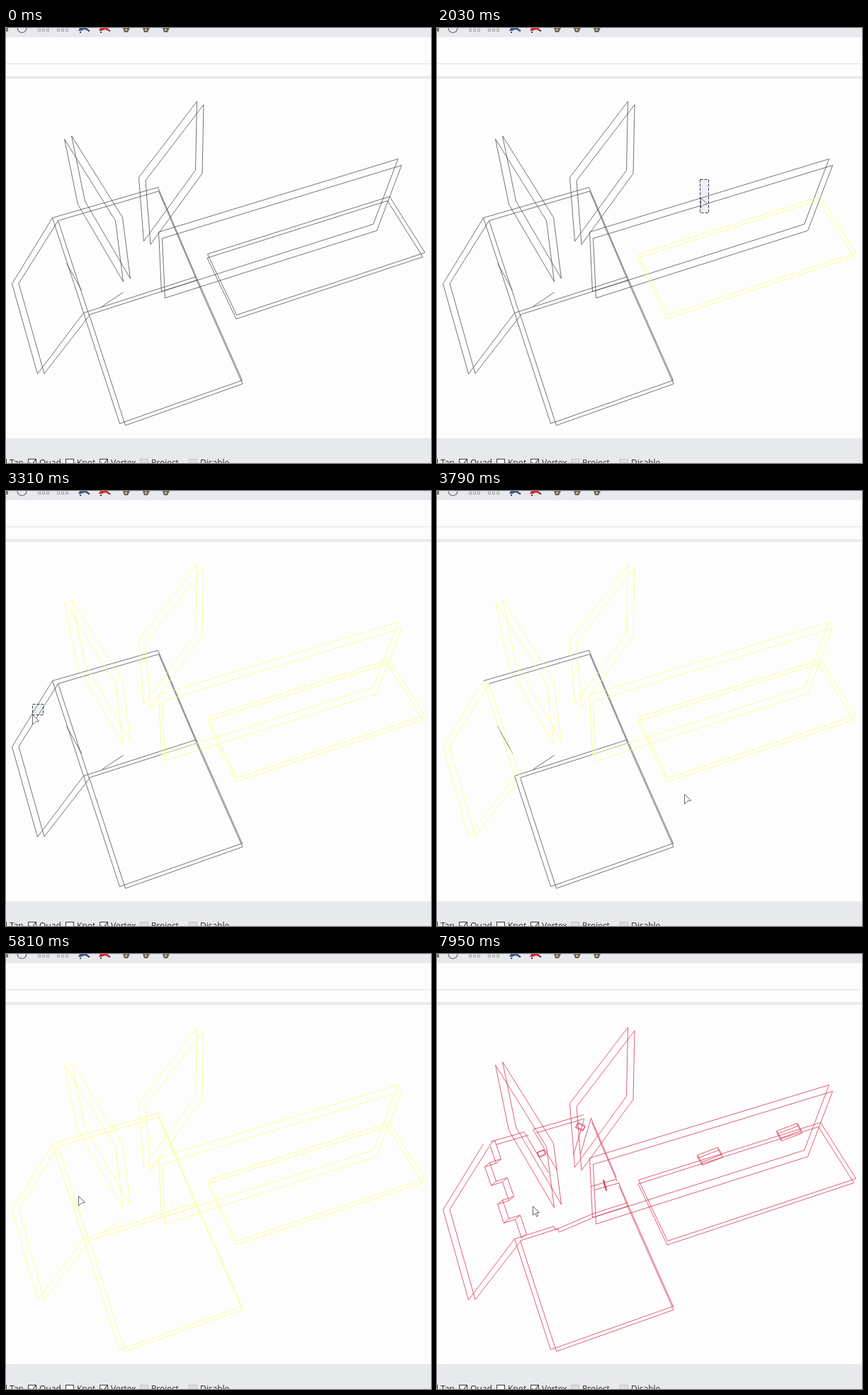
An HTML page with a canvas that plays this animation: 600 px wide and 613 px high, repeating every 8 s.

```html
<!DOCTYPE html>
<html lang="en">
<head>
<meta charset="utf-8">
<title>Selecting panels</title>
<style>
html, body { margin: 0; width: 100%; height: 100%; overflow: hidden; background: #fefdfe; }
canvas { display: block; width: 600px; height: 613px; }
</style>
</head>
<body>
<canvas id="stage" width="600" height="613"></canvas>
<script>
const ctx = document.getElementById('stage').getContext('2d');
const LOOP = 8000, STEP = 160 / 3, DRAG = 110;
const DARK = '#444348', YELLOW = '#f7ff86', RED = '#d02b48';

const mix = (a, b, k) => a + (b - a) * k;
const between = (p, q, k) => [mix(p[0], q[0], k), mix(p[1], q[1], k)];
const add = (p, d) => [p[0] + d[0], p[1] + d[1]];

// A board has a front face and a back face; the first and last corners
// shift by `outer`, the two in between by `inner`.
function board(front, outer, inner = outer) {
  const back = front.map((p, i) => add(p, i % 3 ? inner : outer));
  return [front, back];
}

const lower = board([[541, 237], [284, 318], [325, 404], [591, 316]], [-3, 6], [-0.5, 5.5]);
const long = board([[553, 184], [215, 287], [219, 371], [518, 276]], [5, 9]);
const fin = board([[269, 103], [187, 210], [194, 300], [267, 200]], [9.5, 4.5]);
const blade = board([[82, 156], [101, 248], [165, 357], [154, 271]], [10, -4.5]);
const side = board([[65, 267], [8, 360], [44, 487], [109, 401]], [8, 4], [9.5, -0.5]);
const base = board([[109, 401], [268, 350], [333, 496], [160, 557]], [8, 2.5], [0.5, 5]);
const middle = board([side[0][0], [214, 224], base[0][1], base[0][0]], [8, 4], [1, 5.5]);

function trace(path, points) {
  points.forEach((p, i) => i ? path.lineTo(...p) : path.moveTo(...p));
  return path;
}

function facesPath(faces, closed = true) {
  const path = new Path2D();
  for (const face of faces) {
    trace(path, closed ? face : face.slice(0, 3));
    if (closed) path.closePath();
  }
  return path;
}

// Gestures: start, from, to, and the part they pick.
// The middle board shares its other two edges with its neighbours.
const gestures = [
  [1430, [477, 382], [452, 350], facesPath(lower)],
  [1970, [383, 213], [360, 304], facesPath(long)],
  [2400, [255, 125], [218, 160], facesPath(fin)],
  [2940, [125, 178], [92, 205], facesPath(blade)],
  [3240, [52, 300], [28, 325], facesPath(side)],
  [3970, [325, 430], [288, 424], facesPath(base)],
  [4475, [271, 310], [241, 287], facesPath(middle, false)],
  [4910, [166, 392], [138, 370], trace(new Path2D(), [[135, 392], [165, 372]])],
  [5540, [115, 335], [92, 350], trace(new Path2D(), [[85, 331], [106, 369]])]
].map(([start, from, to, path]) => ({ start, end: start + DRAG, from, to, path }));

const stops = [
  [1120, [592, 352]], [1920, [383, 196]], [2030, [371, 240]], [2770, [145, 138]],
  [3630, [338, 410]], [3790, [349, 427]], [4530, [250, 295]], [5330, [233, 289]],
  [5810, [101, 341]], [5920, [134, 352]], [6290, [135, 355]]
];
const route = [...stops, ...gestures.flatMap(g => [[g.start, g.from], [g.end, g.to]])]
  .sort((a, b) => a[0] - b[0]);

// Brief passes of the pointer before the selecting begins
const passes = [[45, [221, 307]], [100, [171, 2]], [368, [486, 61]]];

function pointerAt(t) {
  const pass = passes.find(p => t >= p[0] && t < p[0] + 55);
  if (pass) return pass[1];
  if (t < route[0][0] - 5) return null;
  const i = route.findIndex(p => p[0] > t);
  if (i < 0) return route[route.length - 1][1];
  if (i === 0) return route[0][1];
  const [t0, p] = route[i - 1], [t1, q] = route[i];
  return between(p, q, (t - t0) / (t1 - t0));
}

// The boards with their joints cut
function joinedPath() {
  const path = new Path2D();
  const line = (...points) => trace(path, points);
  const part = (p, q, a, b) => line(between(p, q, a), between(p, q, b));
  const box = (p, u, v, w) => {
    for (const o of [p, add(p, w)]) {
      line(o, add(o, u), add(add(o, u), v), add(o, v), o);
    }
    for (const o of [p, add(p, u), add(p, v)]) line(o, add(o, w));
  };
  const slot = (p, q, d) => [p, q].forEach(o => line(o, add(o, d)));

  for (const b of [lower, long, fin, blade]) path.addPath(facesPath(b));
  for (const [p, q, r, s] of side) line(p, q, r, s);
  for (const [p, q, r, s] of base) {
    const a = between(p, q, 0.35), b = add(a, [2, 5]);
    line(p, a, b, between(p, q, 0.7), q, r, s, p);
  }
  for (const [p, q, r] of middle) {
    part(p, q, 0.07, 0.39);
    part(p, q, 0.47, 0.95);
    part(q, r, 0.05, 0.72);
    part(q, r, 0.77, 1);
  }

  // Finger joint between the side and the middle
  const start = [72, 272], end = [117, 404], n = 5, depth = [7, -6];
  const comb = [];
  for (let i = 0; i < n; i++) {
    const shift = i % 2 ? [-14, 1] : [2, -4];
    comb.push(add(between(start, end, i / n), shift), add(between(start, end, (i + 1) / n), shift));
  }
  line(...comb);
  line(...comb.map(p => add(p, depth)));
  comb.forEach(p => line(p, add(p, depth)));

  slot([123, 251], [135, 247], [34, 57]);
  slot([207, 233], [217, 231], [-15, 50]);
  slot([252, 317], [257, 322], [-35, 10]);
  box([141, 279], [9, -4], [3, 6], [0, 1]);
  box([198, 238], [10, 5], [-3, 6], [1, -1]);
  box([235, 318], [1, 6], [3, 9], [-1, 0]);
  for (const p of [[367, 283], [479, 249]]) box(p, [29, -11], [6, 10], [1, 4]);
  return path;
}
const joined = joinedPath();

function rect(x, y, w, h, fill) {
  ctx.fillStyle = fill;
  ctx.fillRect(x, y, w, h);
}

function stroke(path, color, width = 0.75) {
  ctx.strokeStyle = color;
  ctx.lineWidth = width;
  ctx.stroke(path);
}

function fill(d, color) {
  ctx.fillStyle = color;
  ctx.fill(new Path2D(d));
}

function drawToolbar() {
  rect(0, 0, 600, 13, '#e8e9ed');
  rect(0, 50, 600, 1, '#dfdfe3');
  rect(0, 68, 600, 1, '#dcdde0');
  rect(0, 70, 600, 1, '#d2d3d7');
  rect(0, 0, 3, 5, '#77787c');
  stroke(new Path2D('M16 0A6.5 6.5 0 0 0 29 0'), '#66676b', 1.1);
  for (const x of [45, 72]) {
    for (let i = 0; i < 3; i++) {
      ctx.strokeStyle = '#aaabb0';
      ctx.strokeRect(x + i * 6 + 0.5, 1.5, 3, 3);
    }
  }
  for (const [x, color] of [[110, '#45548c'], [139, '#cf2a34']]) {
    fill(`M${x - 6} 0h10l5 4h-4l-4 -2 -5 2h-4Z`, color);
    rect(x - 6, 5, 2, 2, '#444');
    rect(x + 6, 3, 2, 2, '#444');
  }
  for (const x of [170, 198, 226]) {
    fill(`M${x - 5} 0h10l-3 6h-5Z`, '#66635e');
    rect(x - 2, 1, 3, 3, '#c6b083');
  }
}

function drawSnapBar() {
  rect(0, 578, 600, 35, '#e8e9ed');
  ctx.font = '12px "Open Sans", "Noto Sans", sans-serif';
  const items = [[-11, 'Tan'], [31, 'Quad', 1], [84, 'Knot'], [132, 'Vertex', 1], [189, 'Project', 0, 1], [258, 'Disable', 0, 1]];
  for (const [x, label, on, grey] of items) {
    rect(x, 607, 12, 12, grey ? '#c4c4c7' : '#3c3c3e');
    rect(x + 1, 608, 10, 10, grey ? '#dcdcde' : '#fff');
    if (on) stroke(new Path2D(`M${x + 2} 612l3 4 6 -8`), '#333', 1.1);
    ctx.fillStyle = '#2c2c2e';
    ctx.fillText(label, x + 16, 617);
  }
}

function drawBoards(t) {
  if (t >= 7725) return stroke(joined, RED);
  const picked = g => t >= g.end && t < 6985;
  const plain = gestures.filter(g => !picked(g));
  plain.forEach(g => stroke(g.path, DARK));
  // Unpicked neighbours lend the middle board its remaining edges
  gestures.filter(picked).forEach(g => stroke(g.path, YELLOW, 0.9));
}

function drawDrag(t) {
  const g = gestures.find(g => t >= g.start && t < g.end);
  if (!g) return;
  const [x0, y0] = g.from;
  const [x1, y1] = between(g.from, g.to, (t - g.start) / DRAG).map(Math.round);
  const box = [Math.min(x0, x1), Math.min(y0, y1), Math.abs(x1 - x0), Math.abs(y1 - y0)];
  ctx.fillStyle = 'rgba(150,175,205,0.16)';
  ctx.fillRect(...box);
  ctx.setLineDash([4, 2]);
  ctx.strokeStyle = '#3c3d44';
  ctx.lineWidth = 1;
  ctx.strokeRect(...box);
  ctx.setLineDash([]);
}

function drawPointer(t) {
  const p = pointerAt(t);
  if (!p) return;
  const selecting = t > 1100 && t < 5915;
  const shape = new Path2D(selecting
    ? 'M0 0V13.5L4 9.6 9 8.6Z'
    : 'M0 0V12.5L3 9.8 5.2 14.5 7.2 13.6 5.2 9H9Z');
  ctx.save();
  ctx.translate(...p.map(Math.round));
  ctx.fillStyle = '#fff';
  ctx.fill(shape);
  stroke(shape, '#55555b', 0.9);
  ctx.restore();
}

function draw(now) {
  const t = Math.floor((now % LOOP + 5) / STEP) * STEP;
  rect(0, 0, 600, 613, '#fefdfe');
  drawToolbar();
  drawSnapBar();
  ctx.save();
  ctx.translate(0.5, 0.5);
  drawBoards(t);
  drawPointer(t);
  drawDrag(t);
  ctx.restore();
}

const start = performance.now();
function tick() {
  draw(performance.now() - start);
  requestAnimationFrame(tick);
}
tick();
</script>
</body>
</html>
```
